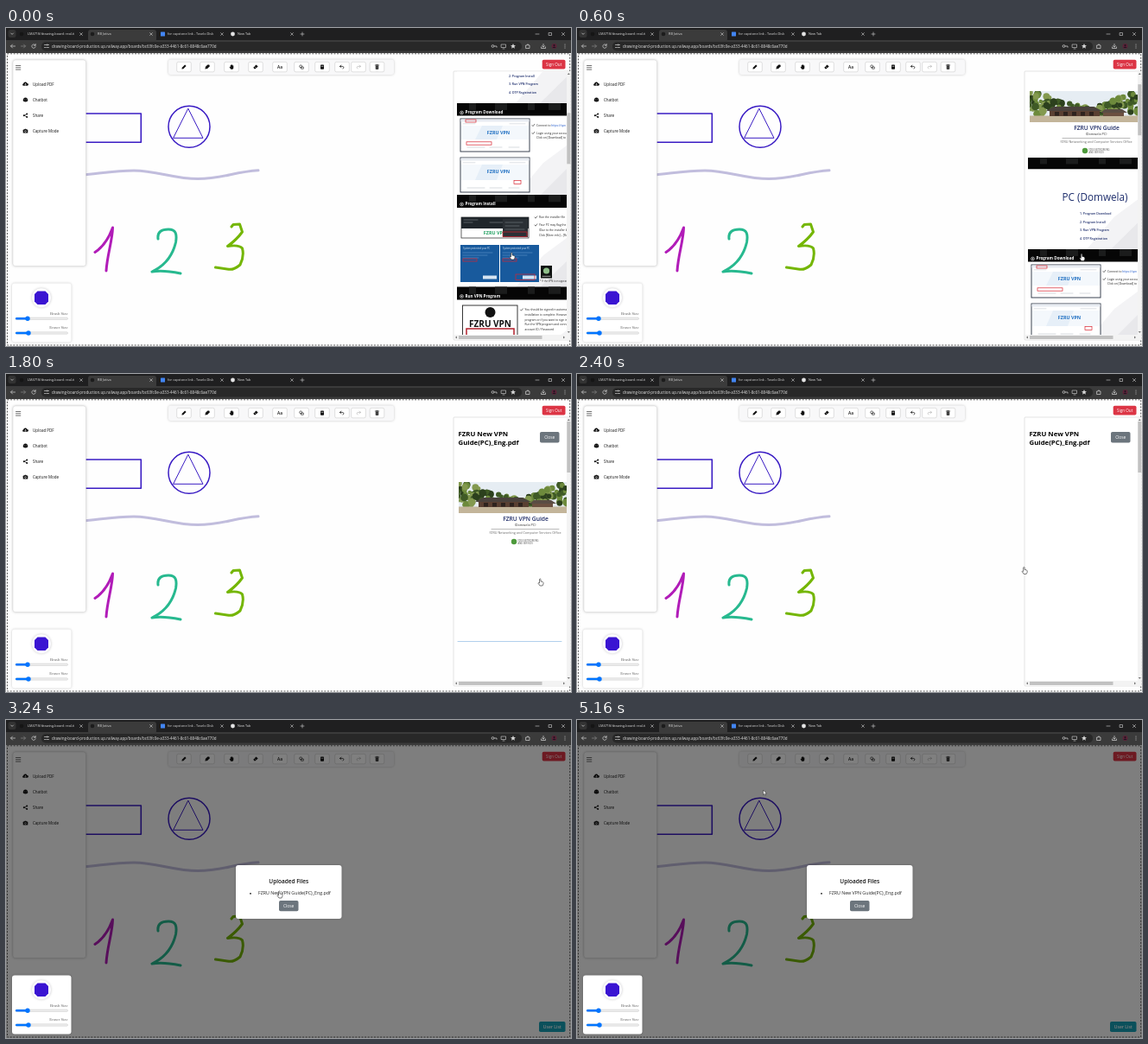
An HTML page for the animation above (5400 ms loop, 654 by 368 pixels).

```html
<!DOCTYPE html>
<html lang="en">
<head>
<meta charset="utf-8">
<title>Drawing board</title>
<style>
html, body { margin: 0; width: 100%; height: 100%; overflow: hidden; background: #fff; }
svg { display: block; width: 654px; height: 368px; font-family: "Open Sans", "Noto Sans", sans-serif; }
.shadow { filter: drop-shadow(0 .5px 1.8px rgba(0, 0, 0, .22)); }
.ink { fill: none; stroke-linecap: round; stroke-linejoin: round; }
</style>
</head>
<body>
<svg id="stage" viewBox="0 0 654 368" xmlns="http://www.w3.org/2000/svg"></svg>
<script>
const LOOP = 5400, STEP = 120;

// Drawing helpers; text is placed by its vertical middle
const text = (x, y, str, size, fill = '#111', attrs = '') =>
  `<text x="${x}" y="${y + size * .36}" font-size="${size}" fill="${fill}" ${attrs}>${str}</text>`;
const mid = (x, y, str, size, fill, attrs = '') => text(x, y, str, size, fill, 'text-anchor="middle" ' + attrs);
const box = (x1, y1, x2, y2, fill, r = 0, attrs = '') =>
  `<rect x="${x1}" y="${y1}" width="${x2 - x1}" height="${y2 - y1}" fill="${fill}" rx="${r}" ${attrs}/>`;
const dot = (x, y, r, fill, attrs = '') => `<circle cx="${x}" cy="${y}" r="${r}" fill="${fill}" ${attrs}/>`;
const line = (d, stroke, w = 1, attrs = '') => `<path d="${d}" class="ink" stroke="${stroke}" stroke-width="${w}" ${attrs}/>`;
const fill = (d, color) => `<path d="${d}" fill="${color}"/>`;
const at = (x, y, body) => `<g transform="translate(${x} ${y})">${body}</g>`;
const group = (id, body) => `<g id="${id}">${body}</g>`;
const BOLD = 'font-weight="700"', SEMI = 'font-weight="600"', MEDIUM = 'font-weight="500"';
const RED = 'stroke="#d8232f" stroke-width=".7"';

function browser() {
  const pale = '#d6d6d6';
  const cross = (x, r = 1.4) => line(`M${x - r} ${7 - r}l${2 * r} ${2 * r}m0 ${-2 * r}l${-2 * r} ${2 * r}`, pale, .6);
  const tab = (x, title) => text(x, 7, title, 3.85, '#dedede');
  return box(0, 0, 654, 15, '#1f1f20') + box(0, 14, 654, 29, '#3b3b3b') +
    box(95, 2, 174, 16, '#3b3b3b', 3) + box(41, 16, 597, 26.5, '#282828', 5) +
    box(2.5, 2, 11.5, 11, '#333', 2.5) + line('M5.7 6l1.4 1.4 1.4-1.4', pale, .7) +
    tab(25, 'LM4718/drawing-board: real-ti') + tab(106, 'RB Jotiva') +
    tab(187, 'for capstone link - Tovelo Disk') + tab(268, 'New Tab') +
    dot(18, 7, 2.3, '#151515') + dot(100, 7, 2.3, '#1c1c1c') +
    box(179, 4.5, 184, 9.5, '#4285f4', .5) + dot(262.5, 7, 2.4, '#e4e4e4') +
    [87, 168, 250, 331].map(x => cross(x)).join('') +
    line('M343 5v4m-2-2h4M613 7h4M628.5 5.5h3v3h-3z', pale, .6) + cross(645, 1.6) +
    line('M10.5 21h-5l2-2m-2 2l2 2', pale, .7) + line('M17.5 21h5l-2-2m2 2l-2 2', '#888', .7) +
    line('M34 20a2.2 2.2 0 1 0 .2 1.8M34.2 18.5v1.7h-1.7', pale, .7) +
    line('M44.5 19.5h2.5m1 0h1.5M44.5 22.5h1.5m1 0h2.5', pale, .7) +
    dot(47.7, 19.5, .7, 'none', `stroke="${pale}" stroke-width=".5"`) +
    text(53, 21, 'drawing-board-production.up.railway.app/boards/bc63fc0e-a333-4461-8c61-8848c6ae770d', 4.5, '#e4e4e4') +
    dot(563.5, 21, 1.4, 'none', `stroke="${pale}" stroke-width=".7"`) + line('M565 21h3v1.3', pale, .7) +
    line('M573.5 19h5v3.5h-5zM575 24h2', pale, .6) +
    fill('M587 18l.9 2 2.1.2-1.6 1.4.5 2.2-1.9-1.2-1.9 1.2.5-2.2-1.6-1.4 2.1-.2z', pale) +
    line('M602 20h1.3v-1h1.4v1h1.3v3.5h-4z', pale, .7) +
    line('M622 18.5v3.5m-1.5-1.3l1.5 1.3 1.5-1.3M619.5 22v1.5h5V22', pale, .7) +
    dot(634.5, 21, 3, '#5b2338') + dot(634.5, 20, 1.1, '#1c1520') + fill('M632.5 23q2-3 4 0z', '#1c1520') +
    [19, 21, 23].map(y => dot(647, y, .5, pale)).join('');
}

function drawing() {
  const blue = '#3a1cc4';
  return line('M60 99H156.3V132.3H60', blue, 1.6) +
    dot(212, 114.3, 24, 'none', `stroke="${blue}" stroke-width="1.5"`) +
    line('M211 93.5L228 127.3H194z', blue, 1) +
    line('M88 170C110 168 128 165 148 165C174 165 195 174.6 222 174.6C250 174.6 264 166.5 292 164.8', '#c1bddd', 3) +
    line('M103 259.5C110 255 118 246 123.5 231C123 247 117 263 116 281', '#b11cb8', 3) +
    line('M176 244C175 236 180 233 188 233C197 233 198 239 196.5 248C193 263 184 275 169 282C180 280 190 281.5 202 284', '#27b98f', 3) +
    line('M261 230L263 227.5L270.5 227L273.5 236Q267 245 256.5 252.5Q270 250.5 273.500 255Q276 264 271 274Q264 280 258 279.3L242.5 277', '#74b604', 3);
}

function sidebar() {
  const items = ['Upload PDF', 'Chatbot', 'Share', 'Capture Mode'];
  const icons = [
    fill('M-2.8 1.8a1.5 1.5 0 0 1 .5-2.6a2.2 2.2 0 0 1 4.2-.3a1.5 1.5 0 0 1 .6 2.9z', '#111') + line('M0 1.3V-.5m-.8.7l.8-.8.8.8', '#fff', .5),
    dot(0, 0, 2.5, '#111') + box(-2.8, -.5, 2.8, 1.6, '#111', 1) + dot(-.9, -.2, .4, '#fff') + dot(.9, -.2, .4, '#fff'),
    line('M1.6-1.6L-1.6 0L1.6 1.6', '#111', .7) + dot(1.7, -1.7, 1, '#111') + dot(-1.7, 0, 1, '#111') + dot(1.7, 1.7, 1, '#111'),
    box(-2.8, -1.7, 2.8, 2.3, '#111', .6) + box(-1.1, -2.5, 1.1, 0, '#111', .4) + dot(0, .3, 1.1, '#fff') + dot(0, .3, .6, '#111')
  ];
  return box(8, 37, 92.5, 275.5, '#fff', 3, 'class="shadow" stroke="#ccc" stroke-width=".4"') +
    line('M11.5 43.5h5.3m-5.3 2.3h5.3m-5.3 2.3h5.3', '#333', .7) +
    items.map((s, i) => at(22.5, 65 + i * 18.1, icons[i]) + text(31, 65 + i * 18.1, s, 4.5, '#111', MEDIUM)).join('');
}

function toolbar() {
  const k = '#111';
  const arrow = (color, flip) => `<g transform="scale(${flip} 1)">${line('M-2.4-.6H1a1.4 1.4 0 0 1 0 2.6M-2.4-.6l1.4-1.3m-1.4 1.3l1.4 1.3', color, .7)}</g>`;
  const pen = fill('M-2.6 2.6l.4-1.9 3.3-3.3 1.5 1.5-3.3 3.3z', k);
  const tools = [
    [206, pen],
    [233, fill('M-2.6 2.6l.6-2.8 2.4-2.4h1.6l.6.6v1.6l-2.400 2.400z', k)],
    [261, fill('M-2.5 0l.8-.3.5.7V-2h.8v-.7h.9v.5h.9v.7h.9V1.5l-.8 1.3h-2.3z', k)],
    [289, fill('M-2.7 .8L.5-2.4l2.2 1.8L-.3 2.3h-1.3z', k) + line('M-1.3-.4l1.8 1.8', '#fff', .5)],
    [317, mid(0, 0, 'Aa', 4.8, k, SEMI)],
    [342, dot(-.8, -.6, 1.5, 'none', `stroke="${k}" stroke-width=".6"`) + line('M0 0h2.3v2.2H0z', k, .6)],
    [366, box(-2, -2.6, 2, 2.7, k, .8) + line('M-1-.7h2', '#fff', .6)],
    [389, arrow(k, 1)],
    [408, arrow('#bbb', -1)],
    [429.5, box(-1.7, -1.4, 1.7, 2.7, k, .5) + line('M-2.2-2h4.4M-.6-2.6h1.2', k, .7) + line('M-.5-.4v2m1-2v2', '#fff', .3)]
  ];
  return box(188, 36.5, 449, 54, '#f8f8f9', 3, 'class="shadow"') +
    tools.map(([x, icon]) => box(x - 8.3, 39.3, x + 8.3, 50.8, '#fff', 1.8, 'stroke="#ccc" stroke-width=".6"') + at(x, 45, icon)).join('');
}

function brushPanel() {
  const slider = (y, x, label) => text(71.5, y - 6.3, label, 4.7, '#666', 'text-anchor="end" font-family="Liberation Serif, serif"') +
    box(11, y - 1.2, 71.5, y + 1.2, '#eee', 1.2, 'stroke="#bbb" stroke-width=".4"') +
    box(11, y - 1.2, x, y + 1.2, '#0075ff', 1.2) + dot(x, y, 2.7, '#0075ff');
  return box(7, 295.5, 75.5, 363.5, '#fff', 3, 'class="shadow"') +
    dot(41, 312.3, 11, '#fff', 'class="shadow"') +
    fill('M36.5 304.5h9l3.5 3.5v8.5l-3.5 3.5h-9L33 316.5v-8.5z', '#3a14d2') +
    slider(336.3, 25, 'Brush Size') + slider(353, 26, 'Eraser Size');
}

function photo() {
  const greens = ['#3f5a26', '#6d8a3c', '#2c401d', '#83994f'];
  const rnd = n => Math.abs(Math.sin(n * 12.9898) * 43758.5453) % 1;
  const trees = Array.from({ length: 150 }, (_, i) => {
    const x = 522 + rnd(i) * 129, edge = Math.abs(x - 592) / 65;
    const top = 145 - 19 * Math.min(1, edge * 1.15);
    return dot(x, top + rnd(i + 200) * (152 - top), 2 + rnd(i + 400) * 2.5, greens[i % 4]);
  }).join('');
  return `<svg x="524" y="125" width="125" height="36" viewBox="524 125 125 36">` +
    box(524, 125, 649, 161, '#e6edf3') + trees +
    box(524, 153.5, 649, 161, '#c3b59a') + fill('M543 148l9-5h46l10 5z', '#4a423d') + fill('M606 150l5-4h20l6 4z', '#5a4d44') +
    box(547, 148, 605, 154, '#5a4032') + box(609, 150, 633, 154, '#6b5040') +
    [553, 563, 573, 583, 593].map(x => box(x, 149, x + 5, 153.5, '#2e231e')).join('') + '</svg>';
}

function firstPage() {
  return photo() + mid(601.5, 168, 'FZRU VPN Guide', 6.7, '#1c2a66', SEMI) +
    mid(601, 174.6, '(Domwela PC)', 3.8, '#333', MEDIUM) + line('M562 179.5h78', '#777', .5) +
    mid(601, 184, 'FZRU Networking and Computer Services Office', 3.75, '#666') +
    dot(588, 194, 3.2, '#4e9a3c') + text(592.5, 192.7, 'FZRU NETWORKING', 2.6, '#555') + text(592.5, 196, 'AND SERVICES', 2.6, '#555');
}

// Remaining slides, in scroll-top coordinates
function slides() {
  const navy = '#1d2d6c';
  const ground = (y1, y2) => box(522, y1, 660, y2, '#fff') +
    fill(`M590 ${y2}L622 ${y1 + 55}L649 ${y1 + 35}V${y2}z`, '#f3f3f5') + fill(`M618 ${y2}L649 ${y1 + 62}V${y2}z`, '#e8e8eb');
  const band = (y, h, title) => box(522, y, 660, y + h, '#060606') +
    [536, 566, 604, 628].map((x, i) => box(x, y, x + 8 + i % 2 * 6, y + h * .55, '#1b1c1c')).join('') +
    (title ? dot(527.5, y + 11, 1.9, 'none', 'stroke="#fff" stroke-width=".6"') + dot(527.5, y + 11, .8, '#fff') +
      text(531.5, y + 10.8, title, 4.6, '#fff', BOLD) : '');
  const note = (x, y, lines, gap = 5.8) => line(`M${x} ${y}l1 1.2 1.8-2.4`, '#222', .6) +
    lines.map((s, i) => text(x + 5, y + i * gap, s, 3.25, '#222', MEDIUM)).join('');
  const site = (y, h) => box(526, y, 606, y + h, '#fff', 0, 'stroke="#26303f" stroke-width=".9"') +
    box(526.5, y + .5, 605.5, y + 3.5, '#e8ecf2') + box(527, y + 8, 605, y + h - 14, '#f4f8fc') +
    line(`M529 ${y + 5.8}h14m40 0h18`, '#c4cad2', .6) + fill(`M551 ${y + 8}h24l-7 ${h - 22}h-25z`, '#e6eff8') +
    mid(570, y + 16, 'FZRU VPN', 5.4, '#1f6fc2', BOLD) +
    line(`M534 ${y + h - 5}h20m6 0h14m8 0h12`, '#bcc4cc', .6);
  const dialog = x => box(x, 473, x + 45, 516, '#185a9d') + text(x + 3, 477, 'System protected your PC', 2.6, '#e6f1fb') +
    line(`M${x + 3} 482h34m-34 3h28m-28 3h18`, '#6c9fd0', .5) + box(x + 3, 489, x + 19, 492, 'none', 0, RED) +
    box(x + 26, 508.5, x + 42, 512.5, '#d6e4f2');
  const intro = band(202, 13.5) + ground(215.5, 308) +
    mid(599.5, 248, 'PC (Domwela)', 11.7, navy, MEDIUM) +
    ['1. Program Download', '2. Program Install', '3. Run VPN Program', '4. OTP Registration'].map((s, i) => text(582, 267 + i * 9.6, s, 3.5, navy, SEMI)).join('');
  const download = ground(323, 416) + band(309, 14.5, 'Program Download') +
    site(327, 38) + box(532, 328, 544, 331, 'none', 0, RED) + box(533, 353.8, 562, 357.2, 'none', 0, RED) +
    site(372, 40) + box(588, 398.5, 596, 402.5, 'none', 0, RED) +
    note(609, 334.5, ['Connect to <tspan fill="#1a55c8">https://vpn</tspan>']) + note(609, 343.5, ['Login using your account', 'Click on [Download] to do']);
  const install = ground(430, 522) + band(415, 15, 'Program Install') +
    box(527, 441, 605, 465, '#fff', 0, 'stroke="#222" stroke-width=".7"') + box(527, 441, 605, 454, '#20262b') +
    line('M530 444h16m-16 3h10m20 0h18', '#7c848a', .6) + mid(566, 459.5, 'FZRU VPN', 5.4, '#22a062', BOLD) +
    box(575, 443, 604, 464, '#2b3035') + line('M578 447h20m-20 4h16m-16 4h22', '#777e84', .6) + box(575, 458, 603, 463.5, 'none', 0, RED) +
    dialog(526) + dialog(572) + box(590, 507, 612, 513.5, 'none', 0, RED) +
    box(619, 497, 632, 511.5, '#101412') + dot(625.5, 503, 3.6, '#8fbf8a') + line('M621 509.3h9', '#ddd', .7) +
    note(612, 441, ['Run the installer file']) + note(612, 450, ['Your PC may flag the file', '(Due to the installer being', 'Click [More info] – [Run']) +
    text(618, 515, '* If the VPN icon appears', 2.8, '#333');
  const run = ground(537, 640) + band(521.5, 15, 'Run VPN Program') +
    box(528.5, 543, 592, 610, '#fff', 0, 'stroke="#222" stroke-width=".9"') + dot(560.5, 551, 6, '#111') +
    mid(560.5, 564, 'FZRU VPN', 10, '#111', BOLD) + box(533, 570, 588, 580, '#fff', 0, 'stroke="#b3202c" stroke-width="1.5"') +
    note(595.5, 548, ['You should be signed in automatically', 'installation is complete. However, if the', 'program or if you want to sign in again', 'Run the VPN program and connect', 'account ID / Password'], 5.7);
  return intro + at(0, -1, download + install + run);
}

function viewer() {
  const tri = (x, y, d) => at(x, y, fill(d, '#777'));
  return box(518, 50, 653, 361, '#fff', 1, 'stroke="#d0d0d0" stroke-width=".6"') +
    `<clipPath id="view"><rect x="519" y="50.5" width="130" height="304.5"/></clipPath><g clip-path="url(#view)">` +
    group('doc', text(523.5, 69, 'FZRU New VPN', 7.8, '#000', BOLD) + text(523.5, 79, 'Guide(PC)_Eng.pdf', 7.8, '#000', BOLD) +
      box(618, 67, 640.5, 79.5, '#6c757d', 1.8) + mid(629.2, 73.3, 'Close', 4.8, '#fff') +
      group('page', firstPage()) + group('slides', slides()) +
      group('blank', box(522, 203, 649, 309, '#fff') + line('M523 309.5h120', '#a9cbea', .9))) + '</g>' +
    box(519, 355, 653, 361, '#f3f3f3') + box(649, 50.5, 653.5, 355, '#f3f3f3') +
    box(524, 356, 620.5, 360, '#c1c1c1') + box(649.3, 0, 653.3, 59, '#c1c1c1', 0, 'id="thumb"') +
    tri(521, 358, 'M-1 0L1-1.5V1.5z') + tri(646, 358, 'M1 0L-1-1.5V1.5z') +
    tri(651.3, 53, 'M0-1L1.5 1H-1.5z') + tri(651.3, 352, 'M0 1L1.5-1H-1.5z');
}

function modal() {
  return box(266, 168, 388.5, 230, '#fff', 3, 'class="shadow"') +
    mid(327.3, 187, 'Uploaded Files', 6.5, '#111', SEMI) + dot(283, 200.8, .9, '#111') +
    text(292, 200.5, 'FZRU New VPN Guide(PC)_Eng.pdf', 5.3, '#222') +
    box(316, 209, 338.5, 221.3, '#6c757d', 1.8) + mid(327.2, 215.2, 'Close', 4.9, '#fff');
}

const cursors = {
  hand: '<path d="M-1.5 1V-3.5Q-.7-4.6 0-3.5V-1Q2.8-1 3 .5V2L2 4H-1L-3 1.2Q-2.7 0-1.5 1z" fill="#fff" stroke="#222" stroke-width=".6"/>',
  plus: line('M-4 0H4M0-4V4', '#111', .9),
  arrow: '<path d="M-1.5-2.5V3.2L-.2 2L.7 4L1.6 3.6L.7 1.7H2.5z" fill="#fff" stroke="#222" stroke-width=".5"/>'
};

const $ = id => document.getElementById(id);
$('stage').innerHTML = box(0, 29, 654, 368, '#fefefe') +
  box(1.5, 29.8, 652.7, 367, 'none', 0, 'stroke="#333" stroke-width=".8" stroke-dasharray="2 1.6"') +
  drawing() + sidebar() + toolbar() +
  box(620.7, 36.7, 647.5, 47.5, '#dc3545', 1.8) + mid(634.2, 42, 'Sign Out', 4.6, '#fff') +
  box(617, 349, 647.5, 361, '#17a2b8', 1.8) + mid(632.3, 355, 'User List', 5, '#fff', SEMI) +
  group('viewer', viewer()) +
  group('shade', box(0, 29, 654, 368, 'rgba(0,0,0,.5)')) + brushPanel() + group('modal', modal()) + browser() +
  Object.entries(cursors).map(([id, body]) => group(id, body)).join('');

// Keys: time, then values
const scrollKeys = [[0, 221], [120, 201], [360, 136.5], [600, 52], [720, 18], [840, 0]];
const cursorKeys = [[0, 586, 264], [360, 586, 265], [960, 583, 266], [1320, 583, 266], [1800, 619, 241],
  [2160, 619, 241], [2880, 316.5, 200.3], [3120, 316.5, 200.3], [3240, 317, 202], [4440, 317, 202],
  [4560, 317, 202.5], [4680, 317, 202.5], [5160, 217, 83.5]];

function sample(keys, t) {
  const i = keys.findIndex(k => k[0] > t);
  if (i < 0) return keys.at(-1).slice(1);
  const [a, b] = [keys[i - 1], keys[i]], p = (t - a[0]) / (b[0] - a[0]);
  return a.slice(1).map((v, j) => v + (b[j + 1] - v) * p);
}
const show = (id, on) => $(id).style.display = on ? '' : 'none';

function draw(now) {
  const t = Math.floor(now % LOOP / STEP) * STEP;
  const [scroll] = sample(scrollKeys, t), [x, y] = sample(cursorKeys, t);
  const reading = t < 2520, asking = t >= 3240;
  show('viewer', reading);
  show('page', t < 2040);
  show('slides', t < 1560);
  show('blank', t >= 1560 && t < 2040);
  show('shade', asking);
  show('modal', asking);
  $('doc').setAttribute('transform', `translate(0 ${-scroll})`);
  $('thumb').setAttribute('y', 55 + scroll * .196);
  const kind = asking ? (t < 4800 ? 'hand' : 'arrow') : reading && x > 518 ? 'hand' : 'plus';
  for (const id in cursors) show(id, id === kind);
  $(kind).setAttribute('transform', `translate(${x} ${y})`);
}

function tick() {
  draw(performance.now());
  requestAnimationFrame(tick);
}
tick();
</script>
</body>
</html>
```
